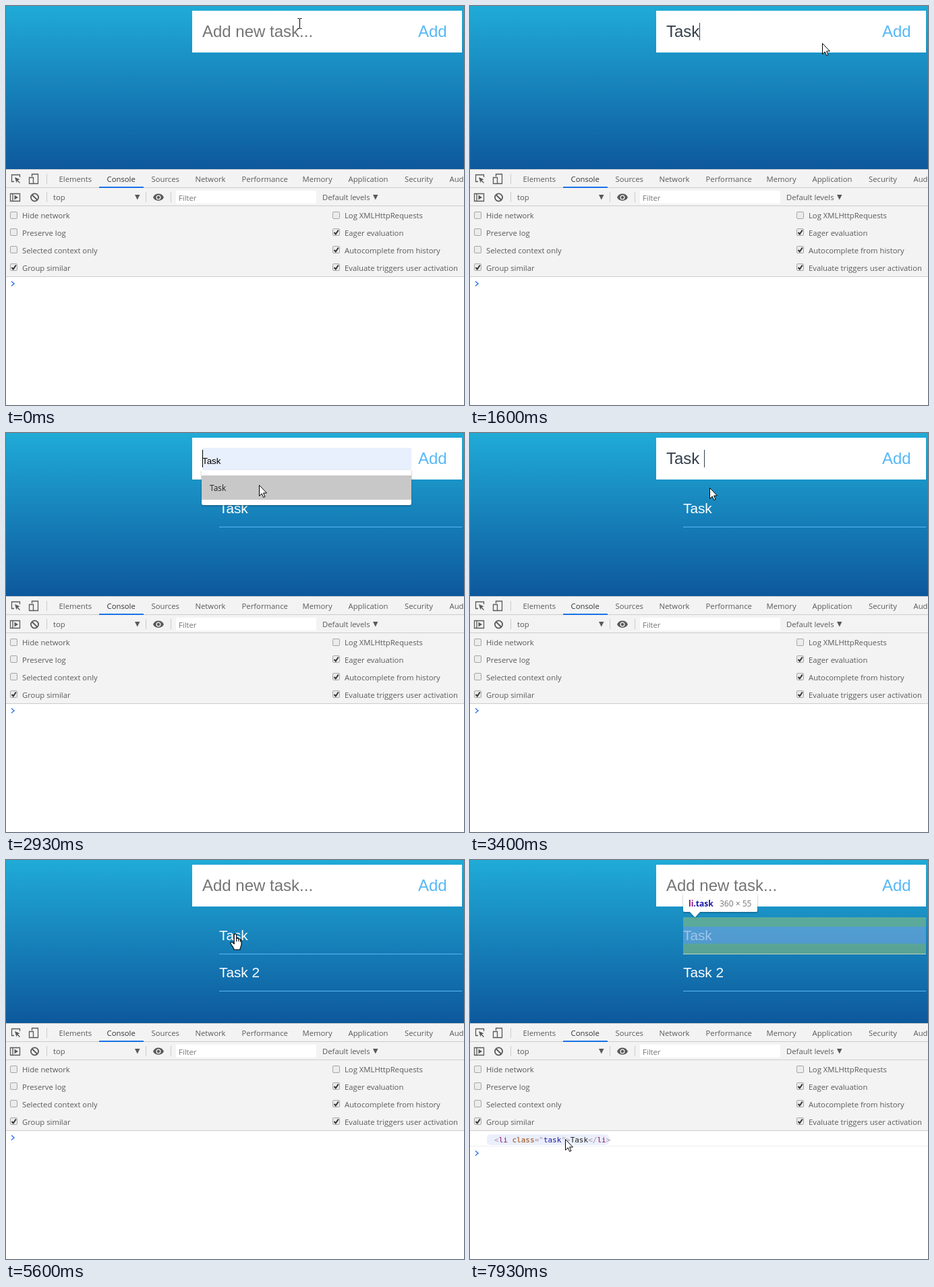
These frames come from a looping animation (679x592 px, 8 s). An HTML page:

```html
<!DOCTYPE html>
<html lang="en">
<head>
<meta charset="utf-8">
<title>Task list with console</title>
<style>
  html, body { margin: 0; width: 100%; height: 100%; overflow: hidden; background: #fff; }
  svg { display: block; width: 679px; height: 592px; }
  .app { font-family: "Liberation Sans", Arial, sans-serif; }
  .ui { font: 11.3px "Open Sans", "Noto Sans", sans-serif; fill: #5a5a5a; }
  .code { font: 11px "DejaVu Sans Mono", monospace; fill: #222; }
  .big { font-size: 24px; }
  .item { font-size: 20.8px; fill: #fff; }
  .icon { fill: none; stroke: #5a5a5a; stroke-width: 1.3; }
  .mark { fill: #5a5a5a; }
</style>
</head>
<body>
<svg viewBox="0 0 679 592">
  <defs>
    <linearGradient id="sky" x1="0" y1="0" x2="0" y2="1">
      <stop offset="0" stop-color="#20abd7"/>
      <stop offset="1" stop-color="#0d589c"/>
    </linearGradient>
    <filter id="shadow" x="-10%" y="-30%" width="120%" height="170%">
      <feDropShadow dx="0" dy="1" stdDeviation="1" flood-opacity=".4"/>
    </filter>
  </defs>

  <rect width="679" height="592" fill="#fff"/>
  <rect width="679" height="242" fill="url(#sky)"/>

  <g class="app">
    <rect x="276" y="7" width="400" height="62" fill="#fff"/>
    <text id="field" class="big" x="291" y="46"></text>
    <text class="big" x="611" y="46" fill="#56b8f7">Add</text>
    <g id="preview">
      <rect x="291" y="22" width="310" height="33" fill="#e8f0fe"/>
      <text x="291" y="46" font-size="13.33">Task</text>
    </g>
    <rect id="caret" y="25" width="1" height="26" fill="#222"/>
    <g id="item1">
      <text class="item" x="316" y="119">Task</text>
      <rect x="316" y="139" width="360" height="1" fill="#56b8f7"/>
    </g>
    <g id="item2">
      <text class="item" x="316" y="174">Task 2</text>
      <rect x="316" y="194" width="360" height="1" fill="#56b8f7"/>
    </g>
  </g>

  <g id="dropdown" class="ui">
    <path d="M290 55H601V104a3 3 0 0 1-3 3H293a3 3 0 0 1-3-3Z" fill="#fff" filter="url(#shadow)"/>
    <rect id="choice" x="290" y="63" width="311" height="36" fill="#c8c8c8"/>
    <text x="302" y="86" font-size="12" font-weight="500" fill="#222">Task</text>
  </g>

  <g id="overlay" class="ui">
    <path d="M316 85h360v14H316ZM316 124h360v15H316Z" fill="#93c47d" fill-opacity=".55"/>
    <rect x="316" y="99" width="360" height="25" fill="#6fa8dc" fill-opacity=".66"/>
    <rect x="316" y="139" width="360" height="1" fill="#ffe599" fill-opacity=".66"/>
    <path d="M318 50H424a2 2 0 0 1 2 2V75a2 2 0 0 1-2 2H341L333.500 85 326 77H318a2 2 0 0 1-2-2V52a2 2 0 0 1 2-2Z" fill="#fff" filter="url(#shadow)"/>
    <text x="324" y="69" font-size="12" font-weight="700" fill="#881280">li<tspan fill="#1a1aa6">.task</tspan></text>
    <text x="370" y="69" font-size="12" fill="#777">360 × 55</text>
  </g>

  <g id="panel" class="ui">
    <rect y="242" width="679" height="160" fill="#f3f3f3"/>
    <path d="M0 242.500H679M0 269.500H679M0 296.500H679M0 401.500H679M60.500 249v15M60.500 276v15M207.500 276v15M244.500 276v15" stroke="#ccc"/>
    <rect x="138" y="268" width="66" height="2" fill="#1a73e8"/>
    <g class="icon">
      <path d="M12 260.500H8.500V250.500H20.500V254"/>
      <path d="M38.500 253V249.500H47.500V263.500H41M34.500 254.500H40.500V263.500H34.500Z"/>
      <path d="M6.500 278.500H20.500V289.500H6.500ZM10 278.500V289.500"/>
      <circle cx="42.500" cy="284" r="5.600" stroke-width="1.800"/>
      <path d="M38.500 280 46.500 288" stroke-width="1.800"/>
    </g>
    <path class="mark" d="M13 254 20.500 257.300 17.500 258.600 21 262 20 263 16.500 259.500 15.500 262.500ZM12.500 280.500 18 284 12.500 287.500ZM191 280h7.500l-3.750 7.500ZM544 280h7.500l-3.750 7.500Z"/>
    <path class="mark" d="M218 284C221 276.800 231 276.800 234 284 231 290.500 221 290.500 218 284Z"/>
    <circle cx="226" cy="284" r="3.500" fill="#f3f3f3"/>
    <circle class="mark" cx="226" cy="284" r="2.200"/>
    <rect x="252" y="274" width="208" height="19" fill="#fff"/>
    <text x="70" y="288">top</text>
    <text x="256" y="289" fill="#757575">Filter</text>
    <text x="469" y="288">Default levels</text>
  </g>

  <g id="log" class="code">
    <rect id="hover" x="25" y="407" width="181" height="16" rx="5" fill="#ebeffb"/>
    <path d="M0 424.500H679" stroke="#f0f0f0"/>
    <text x="36" y="419" fill="#a894a6">&lt;<tspan fill="#881280">li</tspan> <tspan fill="#994500">class</tspan>="<tspan fill="#1a1aa6">task</tspan>"&gt;<tspan fill="#222">Task</tspan>&lt;/<tspan fill="#881280">li</tspan>&gt;</text>
  </g>
  <path id="prompt" d="M8 408.500 12 412 8 415.500" fill="none" stroke="#367cf1" stroke-width="1.600"/>

  <g id="cursor" stroke-linejoin="round">
    <path id="arrow" d="M.500.500V16.500L4.200 13 6.700 18.500 9 17.500 6.600 12H11.500Z" fill="#fff" stroke="#000"/>
    <path id="hand" d="M-1.800 1.200C-1.800-.900 1.700-.900 1.700 1.200V6.500C2.500 5.800 4.600 6 4.900 7.400 5.900 6.800 7.300 7.200 7.600 8.400 8.600 8 9 8.800 9 10V15C9 18 7 19 7 23H-2C-2 20-6.500 16-7 13.500-7.200 11.600-4.600 11.500-3.300 13L-1.800 14.500ZM1.700 6.500V11M4.900 7.400V11M7.600 8.400V11.500" fill="#fff" stroke="#000" stroke-width="1.100"/>
    <path id="beam" d="M-2.500-7.500H-.500L.500-7 1.500-7.500H3.500M.500-7V7M-2.500 7.500H-.500L.500 7 1.500 7.500H3.500" fill="none" stroke="#000"/>
  </g>
</svg>
<script>
const NS = 'http://www.w3.org/2000/svg';
const el = id => document.getElementById(id);
const show = (id, on) => el(id).setAttribute('display', on ? 'inline' : 'none');
const within = (n, from, to) => n >= from && n < to;

function add(tag, attrs, text = '') {
  const node = document.createElementNS(NS, tag);
  for (const key in attrs) node.setAttribute(key, attrs[key]);
  node.textContent = text;
  el('panel').append(node);
}

const tabs = { Elements: 78.5, Console: 149.5, Sources: 215.5, Network: 280.5, Performance: 349.5,
  Memory: 439.5, Application: 507.5, Security: 591, Audits: 657.5 };
for (const name in tabs)
  add('text', { x: tabs[name], y: 261, fill: name === 'Console' ? '#333' : '#5a5a5a' }, name);

function checkbox(x, row, label, checked) {
  const y = 305 + row * 26;
  add('rect', { x: x + .5, y: y + .5 - (row > 0), width: 10, height: 10, rx: 1.5, fill: '#ececec', stroke: '#a6a6a6' });
  if (checked)
    add('path', { d: `M${x + 2.5} ${y + 5}l2.300 2.500 4-6`, fill: 'none', stroke: '#333', 'stroke-width': 2 });
  add('text', { x: x + 18, y: y + 10 }, label);
}
['Hide network', 'Preserve log', 'Selected context only', 'Group similar']
  .forEach((label, row) => checkbox(6, row, label, row === 3));
['Log XMLHttpRequests', 'Eager evaluation', 'Autocomplete from history', 'Evaluate triggers user activation']
  .forEach((label, row) => checkbox(484, row, label, row > 0));

// The screen refreshes 15 times a second; all times below are in ticks.
const TICKS = 120, LOOP = 8000;
const pointerPath = [
  [0, 435, 26], [9, 398, 44], [12, 398, 44], [14, 379, 70], [17, 376, 78], [20, 376, 78],
  [27, 632, 38], [30, 632, 38], [37, 434, 44], [40, 434, 44], [42, 395, 72], [46, 355, 81],
  [51, 355, 81], [54, 390, 98], [61, 616, 38], [63, 616, 38], [68, 500, 130], [74, 382, 91],
  [76, 373, 105], [78, 373, 105], [82, 326, 128], [84, 340, 110], [95, 340, 110],
  [99, 250, 280], [103, 100, 445], [104, 65, 460], [106, 41, 422], [108, 31, 420],
  [111, 29, 417], [113, 29, 417], [119, 141, 414]
];

function pointerAt(tick) {
  const next = pointerPath.findIndex(key => key[0] > tick);
  if (next < 0) return pointerPath.at(-1).slice(1);
  const [t0, x0, y0] = pointerPath[next - 1], [t1, x1, y1] = pointerPath[next];
  const k = (tick - t0) / (t1 - t0);
  return [Math.round(x0 + (x1 - x0) * k), Math.round(y0 + (y1 - y0) * k)];
}

function typedAt(tick) {
  if (within(tick, 19, 31) || within(tick, 49, 51)) return 'Task';
  if (within(tick, 51, 53)) return 'Task ';
  return within(tick, 53, 63) ? 'Task 2' : '';
}

const caretX = { '': 291, 'Task': 340, 'Task ': 347, 'Task 2': 360 };
const caretSpans = [[7, 15], [19, 27], [38, 46], [49, 61]];

function draw(tick) {
  const [x, y] = pointerAt(tick);
  const typed = typedAt(tick);
  const items = (tick >= 31) + (tick >= 63);
  const open = within(tick, 7, 19) || within(tick, 38, 49);
  const chosen = open && y >= 63;
  const logged = tick >= 91, hovered = tick >= 105;

  el('field').textContent = typed || 'Add new task...';
  el('field').setAttribute('fill', typed ? '#34404c' : '#757575');
  el('caret').setAttribute('x', caretX[typed]);
  el('caret').setAttribute('fill', typed ? '#34404c' : '#000');
  show('caret', caretSpans.some(([from, to]) => within(tick, from, to)));
  show('preview', chosen);
  show('dropdown', open);
  show('choice', chosen);
  show('item1', items > 0);
  show('item2', items > 1);
  show('overlay', hovered);
  show('hover', hovered);
  show('log', logged);
  el('prompt').setAttribute('transform', `translate(0 ${logged ? 23 : 0})`);

  const onAdd = x > 601 && within(y, 7, 69);
  const onItem = !open && x >= 316 && within(y, 85, 85 + 55 * items);
  const onField = within(x, 291, 602) && within(y, 22, 55);
  show('hand', onAdd || onItem);
  show('beam', onField);
  show('arrow', !onAdd && !onItem && !onField);
  el('cursor').setAttribute('transform', `translate(${x} ${y})`);
}

const start = performance.now();
function frame() {
  const time = (performance.now() - start) % LOOP;
  draw(Math.floor((time + 5) * TICKS / LOOP) % TICKS);
  requestAnimationFrame(frame);
}
frame();
</script>
</body>
</html>
```
